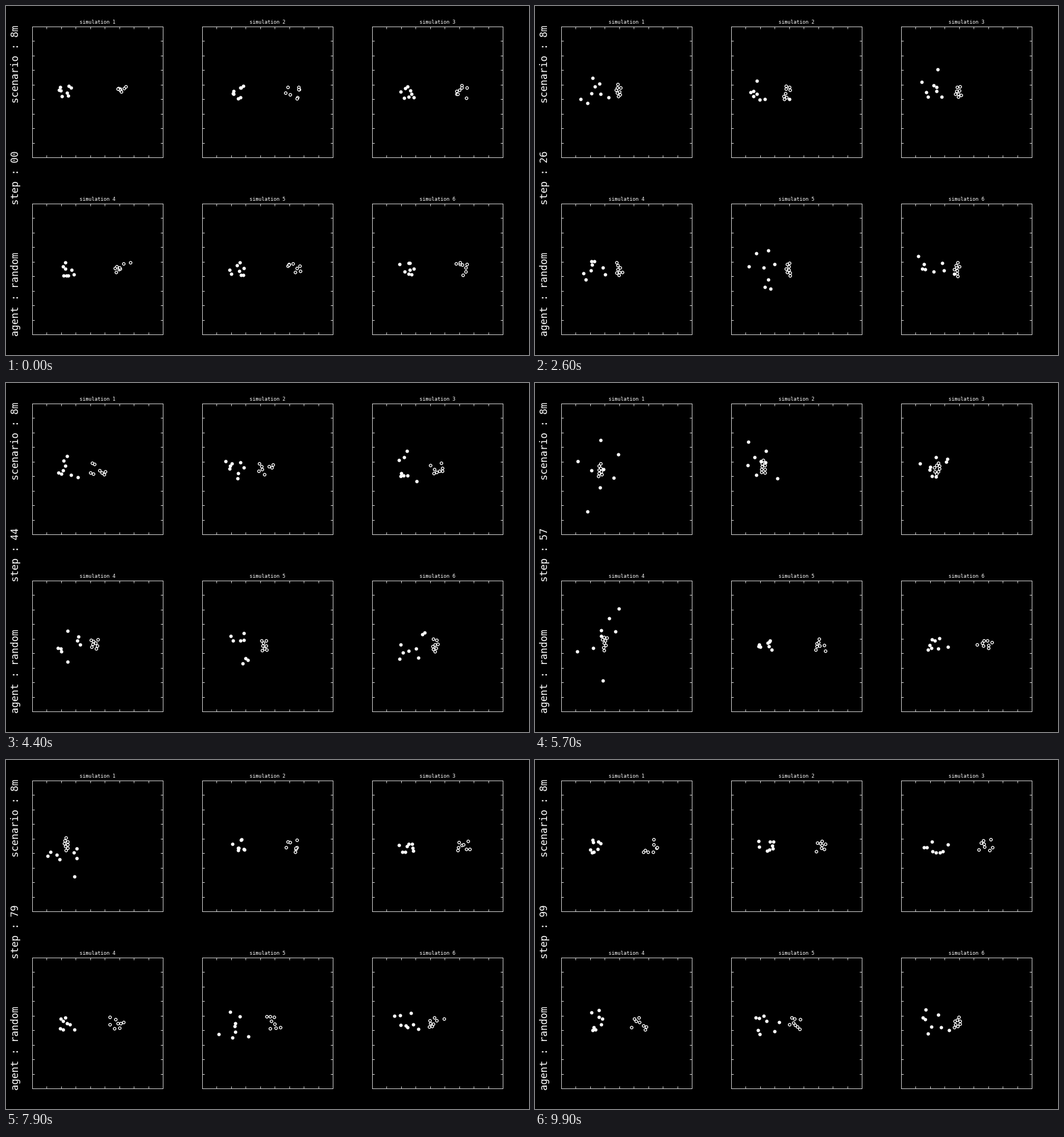
These frames come from a looping animation (917x611 px, 10000 ms). A matplotlib script:

```python
import numpy as np
import matplotlib.pyplot as plt
from matplotlib.animation import FuncAnimation

W, H, DPI = 917, 611, 64
PT = 72 / DPI            # points per pixel
SIDE = 229
STEPS = 100
STRIDE = 11.2            # pixels a unit covers per step
LINE = "0.85"
MONO = "DejaVu Sans Mono"


def corner(k):
    row, col = divmod(k, 3)
    return 46 + 298 * col, 36 + 310 * row


def spawn(rng, x, y):
    return np.array([x, y]) + rng.uniform((-14, -12), (14, 12), (8, 2))


def wander(rng, allies):
    """Random actions: some units step up, down, left or right."""
    angle = rng.integers(4, size=8) * np.pi / 2
    reach = STRIDE * (rng.random(8) < 0.45)
    return allies + np.column_stack([reach * np.cos(angle), reach * np.sin(angle)])


def advance(foes, goal, hold):
    """Close in on the goal until the holding distance is reached."""
    gap = (goal - foes) * (1, 0.1)
    dist = np.linalg.norm(gap, axis=1) + 1e-6
    return foes + gap * (np.clip(dist - hold, 0, STRIDE) / dist)[:, None]


def separate(units, size=5.2):
    for _ in range(5):
        diff = units[:, None] - units[None]
        dist = np.maximum(np.linalg.norm(diff, axis=2), 0.01)
        push = np.clip(size - dist, 0, None) / 2
        units = units + (diff / dist[..., None] * push[..., None]).sum(axis=1)
    return units


def simulate(k):
    """Fight episodes back to back; later panels finish a little sooner."""
    rng = np.random.default_rng(40 + k)
    x0, y0 = corner(k)
    length = 19.8 - 0.05 * k ** 2
    track, episode = [], -1
    for step in range(STEPS):
        if int(step / length) != episode:
            episode, age = int(step / length), 0
            slack = rng.uniform(-4, 4, 8)
            units = np.vstack([spawn(rng, x0 + 60, y0 + 115),
                               spawn(rng, x0 + 158, y0 + 114)])
        else:
            age += 1
            # Hold fire range first, then press into the thinning line.
            hold = 42 - 6 * np.clip(age - 9, 0, 6) + slack
            allies = wander(rng, units[:8])
            foes = advance(units[8:], allies.mean(axis=0), hold)
            units = separate(np.vstack([allies, foes]))
        track.append(units)
    return np.array(track)


fig = plt.figure(figsize=(W / DPI, H / DPI), dpi=DPI, facecolor="black")


def side_label(y, text):
    return fig.text(22 / W, 1 - y / H, text, color="white", family=MONO,
                    size=17.45 * PT, rotation=90, rotation_mode="anchor",
                    ha="left", va="baseline")


def make_panel(k):
    x0, y0 = corner(k)
    ax = fig.add_axes([x0 / W, 1 - (y0 + SIDE) / H, SIDE / W, SIDE / H],
                      facecolor="black")
    ticks = np.arange(1, 9) * SIDE / 9
    ax.set(xlim=(x0, x0 + SIDE), ylim=(y0 + SIDE, y0),
           xticks=x0 + ticks, yticks=y0 + ticks)
    ax.tick_params(direction="in", top=True, right=True, color=LINE,
                   length=4 * PT, width=PT, labelbottom=False, labelleft=False)
    for spine in ax.spines.values():
        spine.set(color=LINE, linewidth=PT)
    ax.text(x0 + SIDE / 2, y0 - 4.7, f"simulation {k + 1}", color="white",
            family=MONO, size=8.7 * PT, ha="center", va="baseline")
    foes, = ax.plot([], [], "o", ms=4.6 * PT, mew=1.4 * PT,
                    mfc="black", mec="white", zorder=3)
    allies, = ax.plot([], [], "o", ms=6 * PT, mew=0, color="white", zorder=4)
    return allies, foes


side_label(170.5, "scenario : 8m")
counter = side_label(348, "step : 00")
side_label(577.5, "agent : random")

panels = [make_panel(k) for k in range(6)]
tracks = [simulate(k) for k in range(6)]


def draw(step):
    counter.set_text(f"step : {step:02d}")
    for (allies, foes), track in zip(panels, tracks):
        allies.set_data(*track[step, :8].T)
        foes.set_data(*track[step, 8:].T)
    return [counter, *sum(panels, ())]


anim = FuncAnimation(fig, draw, frames=STEPS, interval=100,
                     repeat=True, repeat_delay=0, blit=False)
plt.show()
```
